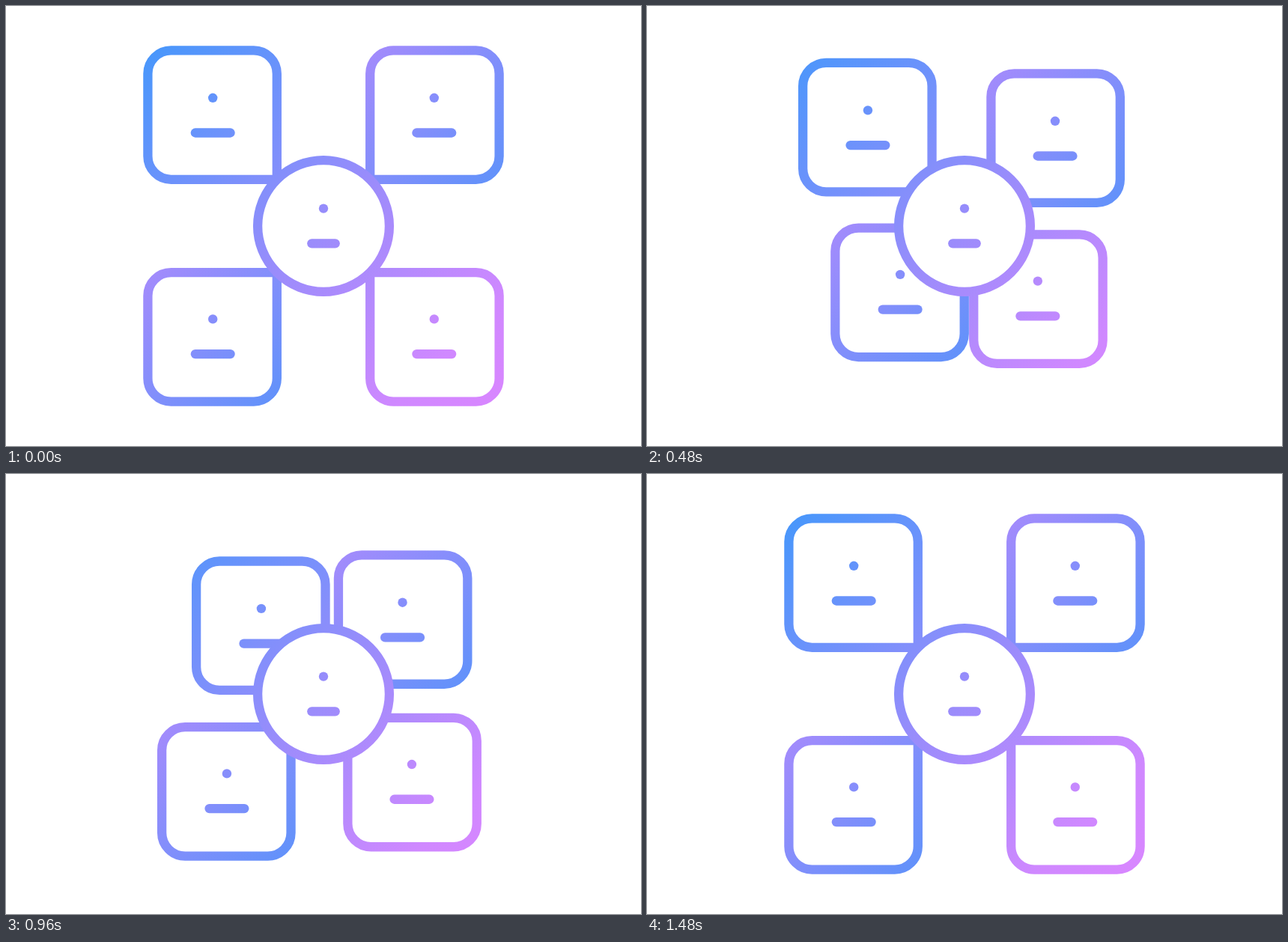
These frames come from a looping animation (848x588 px, 2000 ms). An HTML page:

```html
<!DOCTYPE html>
<html lang="en">
<head>
<meta charset="utf-8">
<title>Four tiles</title>
<style>
  html, body { margin: 0; width: 100%; height: 100%; overflow: hidden; background: #fff; }
  svg { display: block; width: 848px; height: 588px; }
</style>
</head>
<body>
<svg id="stage" viewBox="0 0 848 588" fill="none" stroke-width="12.3" stroke-linecap="round"></svg>
<script>
const NS = 'http://www.w3.org/2000/svg';
const stage = document.getElementById('stage');
const CX = 424, CY = 294, LOOP = 2000, RISE = 560, FALL = 640;
const HALF = 86.2, RADIUS = 31, BOX_GAP = 148.4, MARK_GAP = 147.8;

const WIDE = [[0, '#4697fb'], [0.5, '#9a8cfb'], [0.85, '#d088ff'], [1, '#d986ff']];
const COOL = [[0, '#a58bfc'], [1, '#5f92fa']];

// side x, side y, start time, inward travel; later tiles lie on top
const tiles = [
  { sx: -1, sy: -1, start: 280, dx: 69.8, dy: 61.6 },
  { sx: 1, sy: -1, start: 200, dx: -53.2, dy: 61.6 },
  { sx: -1, sy: 1, start: 0, dx: 64.5, dy: -62 },
  { sx: 1, sy: 1, start: 80, dx: -60, dy: -61 }
];

function add(parent, tag, attrs) {
  const node = document.createElementNS(NS, tag);
  for (const key in attrs) node.setAttribute(key, attrs[key]);
  return parent.appendChild(node);
}

function gradient(id, x, y, half, stops) {
  const node = add(stage, 'linearGradient', {
    id, gradientUnits: 'userSpaceOnUse',
    x1: x - half, y1: y - half, x2: x + half, y2: y + half
  });
  stops.forEach(([offset, color]) => add(node, 'stop', { offset, 'stop-color': color }));
  return node;
}

// Dot above a short bar
function mark(parent, x, y, half, paint) {
  add(parent, 'circle', { cx: x, cy: y - 23.4, r: 6.2, fill: paint });
  add(parent, 'path', { d: `M${x - half} ${y + 23.3}h${half * 2}`, stroke: paint });
}

// Rounded square whose corner nearest the centre is sharp
function tilePath(x, y, sx, sy) {
  const at = (u, v) => `${x + u * sx} ${y + v * sy}`;
  const k = HALF - RADIUS, h = HALF, sweep = sx * sy > 0 ? 1 : 0;
  const arc = `A${RADIUS} ${RADIUS} 0 0 ${sweep} `;
  return `M${at(-h, -h)}L${at(k, -h)}${arc}${at(h, -k)}L${at(h, k)}${arc}${at(k, h)}` +
    `L${at(-k, h)}${arc}${at(-h, k)}Z`;
}

function buildTile(tile, i) {
  const { sx, sy } = tile;
  const x = CX + sx * BOX_GAP, y = CY + sy * BOX_GAP;
  const paint = `url(#g${i})`;
  tile.fixed = sx === sy;
  tile.paint = tile.fixed
    ? gradient('g' + i, CX, CY, 241, WIDE)
    : gradient('g' + i, x, y, 92, COOL);
  tile.group = add(stage, 'g', {});
  // the inner corner is sharp, the other three are round
  add(tile.group, 'path', { d: tilePath(x, y, sx, sy), stroke: paint });
  mark(tile.group, CX + sx * MARK_GAP, CY + sy * MARK_GAP, 23.4, paint);
}

// Cubic ease in and out with handles at .42 and .58
function ease(x) {
  if (x <= 0) return 0;
  if (x >= 1) return 1;
  let s = x;
  for (let i = 0; i < 6; i++) {
    s -= (((0.52 * s - 0.78) * s + 1.26) * s - x) / ((1.56 * s - 1.56) * s + 1.26);
  }
  return s * s * (3 - 2 * s);
}

function draw(time) {
  for (const tile of tiles) {
    const t = time - tile.start;
    const k = t < RISE ? ease(t / RISE) : 1 - ease((t - RISE) / FALL);
    const x = tile.dx * k, y = tile.dy * k;
    tile.group.setAttribute('transform', `translate(${x} ${y})`);
    if (tile.fixed) tile.paint.setAttribute('gradientTransform', `translate(${-x} ${-y})`);
  }
}

tiles.forEach(buildTile);
gradient('hub', CX, CY, 241, WIDE);
add(stage, 'circle', { cx: CX, cy: CY, r: 87.9, fill: '#fff', stroke: 'url(#hub)' });
mark(stage, CX, CY, 15.7, 'url(#hub)');

const begin = performance.now();
function tick() {
  draw((performance.now() - begin) % LOOP);
  requestAnimationFrame(tick);
}
draw(0);
requestAnimationFrame(tick);
</script>
</body>
</html>
```
